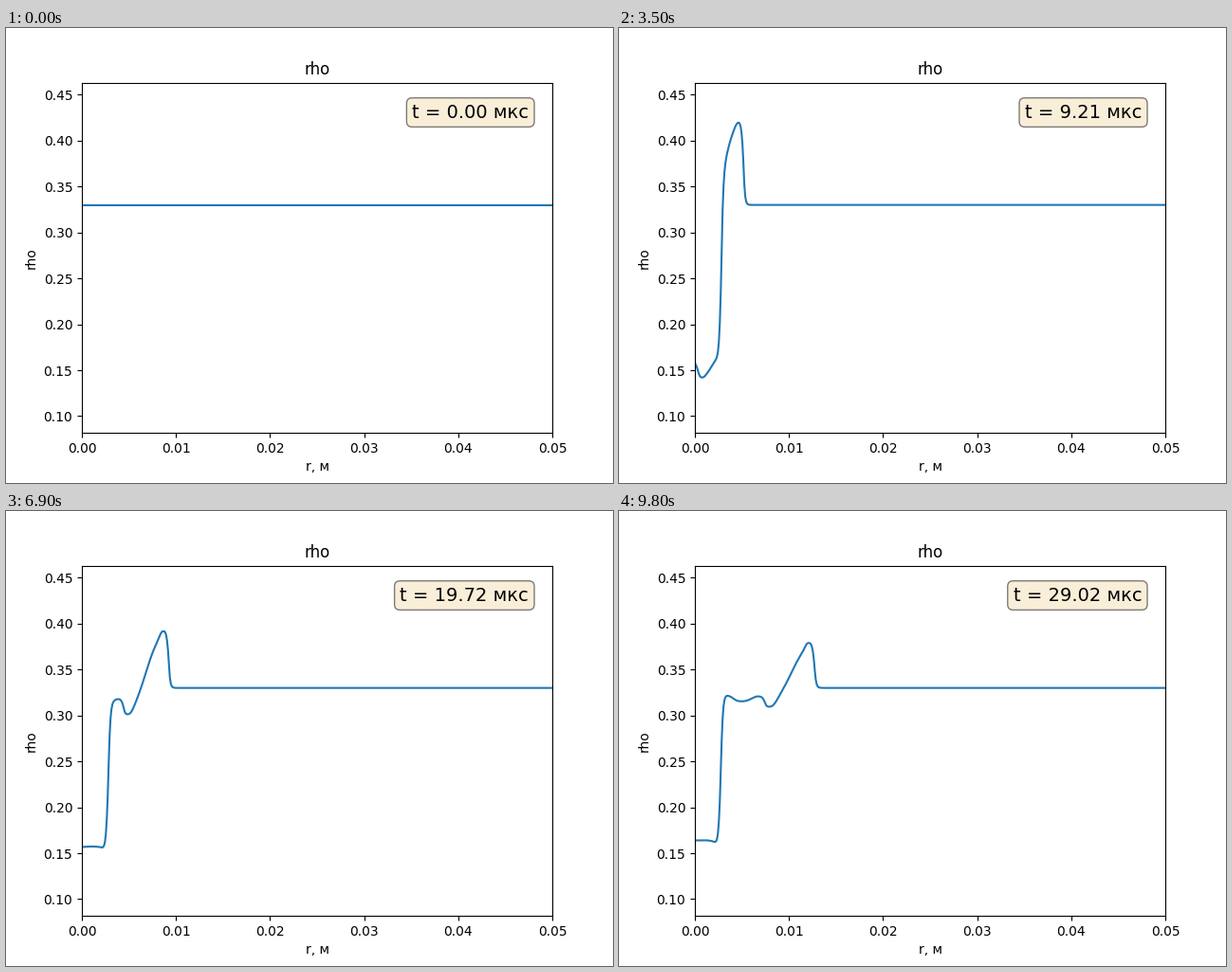
These frames come from a looping animation (640x480 px, 9900 ms). A matplotlib script:

```python
import numpy as np
import matplotlib.pyplot as plt
from matplotlib.animation import FuncAnimation

# Cylindrical gas column, heated for a short time, drives a blast wave (SI units).
GAMMA = 1.4
RHO0, P0 = 0.33, 26664.0
LENGTH, CELLS = 0.05, 500
HEAT_RADIUS, HEAT_TIME, HEAT_RATIO = 0.002, 3e-6, 2.55
CFL = 0.3
FRAMES, INTERVAL = 99, 100

# Clock readings (microseconds) at known steps of the loop.
MARK_STEPS = [0, 16, 35, 53, 69, 79, 98]
MARK_TIMES = [0, 4.43, 9.21, 14.61, 19.72, 22.90, 29.02]

dx = LENGTH / CELLS
faces = np.linspace(0, LENGTH, CELLS + 1)
r = 0.5 * (faces[1:] + faces[:-1])
heat_rate = (HEAT_RATIO - 1) * P0 / ((GAMMA - 1) * RHO0 * HEAT_TIME)
heated = np.where(r < HEAT_RADIUS, heat_rate, 0.0)


def conserved(w):
    rho, u, p = w
    return np.array([rho, rho * u, p / (GAMMA - 1) + 0.5 * rho * u**2])


def primitive(q):
    rho, m, e = q
    u = m / rho
    return np.array([rho, u, (GAMMA - 1) * (e - 0.5 * m * u)])


def sound(w):
    return np.sqrt(GAMMA * w[2] / w[0])


def minmod(a, b):
    return np.where(a * b > 0, np.sign(a) * np.minimum(abs(a), abs(b)), 0.0)


def hllc(left, right):
    cl, cr = sound(left), sound(right)
    sl = np.minimum(left[1] - cl, right[1] - cr)
    sr = np.maximum(left[1] + cl, right[1] + cr)
    ml = left[0] * (sl - left[1])
    mr = right[0] * (sr - right[1])
    sm = (right[2] - left[2] + ml * left[1] - mr * right[1]) / (ml - mr)

    from_left = sm > 0
    w = np.where(from_left, left, right)
    s = np.where(from_left, sl, sr)
    rho, u, p = w
    q = conserved(w)
    flux = np.array([rho * u, rho * u**2 + p, u * (q[2] + p)])
    energy = q[2] / rho + (sm - u) * (sm + p / (rho * (s - u)))
    star = rho * (s - u) / (s - sm) * np.array([np.ones_like(sm), sm, energy])
    speed = np.where(from_left, np.minimum(s, 0), np.maximum(s, 0))
    return flux + speed * (star - q)


def rate(q, heat_share):
    w = primitive(q)
    mirror = w[:, 1::-1] * np.array([[1], [-1], [1]])
    padded = np.hstack([mirror, w, w[:, -1:], w[:, -1:]])
    d = np.diff(padded, axis=1)
    slope = minmod(d[:, :-1], d[:, 1:])
    mid = padded[:, 1:-1]
    flux = hllc((mid + 0.5 * slope)[:, :-1], (mid - 0.5 * slope)[:, 1:])
    out = -np.diff(faces * flux, axis=1) / (r * dx)
    out[1] += w[2] / r
    out[2] += heat_share * heated * w[0]
    return out


def simulate(t_end):
    """Return times, accumulated signal path and density after every step."""
    q = conserved(np.array([np.full(CELLS, RHO0), np.zeros(CELLS), np.full(CELLS, P0)]))
    t = path = 0.0
    times, paths, profiles = [t], [path], [q[0].copy()]
    while t < t_end:
        w = primitive(q)
        fastest = np.max(abs(w[1]) + sound(w))
        dt = CFL * dx / fastest
        share = np.clip((HEAT_TIME - t) / dt, 0, 1)
        q1 = q + dt * rate(q, share)
        q = 0.5 * (q + q1 + dt * rate(q1, share))
        t += dt
        path += dt * fastest
        times.append(t)
        paths.append(path)
        profiles.append(q[0].copy())
    return np.array(times) * 1e6, np.array(paths), np.array(profiles)


times, paths, profiles = simulate(29.3e-6)

# Frames are evenly spaced in signal path, so the clock runs slower in hot gas.
mark_paths = np.interp(MARK_TIMES, times, paths)
clock = np.interp(np.interp(np.arange(FRAMES), MARK_STEPS, mark_paths), paths, times)


def density(t):
    pos = np.interp(t, times, np.arange(len(times)))
    i = min(int(pos), len(times) - 2)
    return profiles[i] + (pos - i) * (profiles[i + 1] - profiles[i])


fig, ax = plt.subplots(figsize=(6.4, 4.8), dpi=100)
line, = ax.plot(r, profiles[0])
ax.set(xlim=(0, LENGTH), ylim=(0.0817, 0.4632), title="rho", xlabel="r, м", ylabel="rho")
label = ax.text(0.95, 0.9, "", transform=ax.transAxes, fontsize=14, ha="right",
                bbox=dict(boxstyle="round", facecolor="wheat", alpha=0.5))


def update(i):
    line.set_ydata(density(clock[i]))
    label.set_text(f"t = {clock[i]:.2f} мкс")
    return line, label


anim = FuncAnimation(fig, update, frames=FRAMES, interval=INTERVAL, repeat=True)
plt.show()
```
